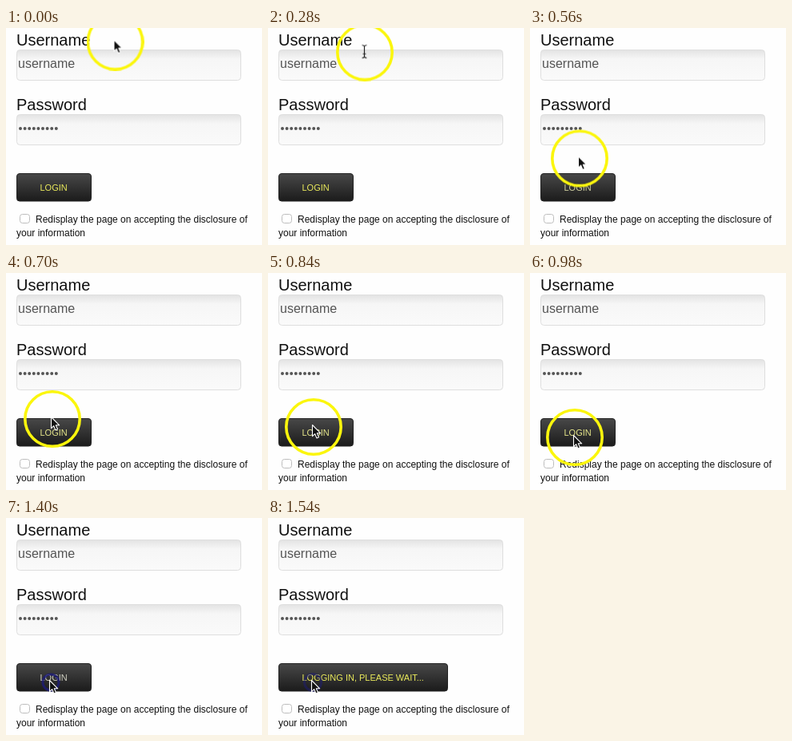
An HTML page that plays this animation: 320x272 px, repeating every 1580 ms.

```html
<!DOCTYPE html>
<html lang="en">
<head>
<meta charset="utf-8">
<title>Login form</title>
<style>
  html, body { margin: 0; width: 100%; height: 100%; overflow: hidden; background: #fefefe; }
  svg { display: block; width: 320px; height: 272px; font-family: "Liberation Sans", Arial, sans-serif; }
  .label { font-size: 20px; fill: #111; }
  .value { font-size: 16px; fill: #555; }
  .note { font-size: 12px; fill: #111; }
  .caption { font-size: 11px; fill: #ecec5c; }
  .field { fill: url(#inset); stroke: #dedede; }
  .dots { stroke: #555; stroke-width: 4; stroke-linecap: round; stroke-dasharray: 0 5.6; }
  .button { fill: url(#dark); stroke: #222; }
  .ring { fill: none; stroke: #fbf60c; stroke-width: 3.6; }
  .press { fill: none; stroke: #1d1c78; stroke-width: 3; }

  .pointer, .ring, .press, .arrow, .beam, .idle, .busy, .idle .caption {
    animation: 1580ms step-end infinite;
  }
  .pointer { animation-name: move; }
  .ring { animation-name: release; }
  .press { animation-name: press; }
  .arrow { animation-name: arrow; }
  .beam { animation-name: beam; }
  .idle { animation-name: idle; }
  .busy { animation-name: busy; }
  .idle .caption { animation-name: tint; }

  @keyframes move {
    0% { transform: translate(136.5px, 17.5px); }
    8.86% { transform: translate(136px, 19px); }
    17.72% { transform: translate(121px, 30.5px); }
    26.58% { transform: translate(77px, 116px); }
    35.44% { transform: translate(62px, 163.5px); }
    44.3% { transform: translate(58px, 183px); }
    53.16% { transform: translate(57px, 193px); }
    62.02%, 100% { transform: translate(56px, 206px); }
  }
  @keyframes release {
    0% { opacity: 1; }
    79.74%, 100% { opacity: 0; }
  }
  @keyframes press {
    0% { opacity: 0; r: 9.5px; }
    79.74% { opacity: .95; r: 9.5px; }
    88.6% { opacity: .8; r: 10px; }
    97.46%, 100% { opacity: .5; r: 10.5px; }
  }
  @keyframes arrow {
    0% { opacity: 1; }
    17.72% { opacity: 0; }
    26.58%, 100% { opacity: 1; }
  }
  @keyframes beam {
    0% { opacity: 0; }
    17.72% { opacity: 1; }
    26.58%, 100% { opacity: 0; }
  }
  @keyframes idle {
    0% { opacity: 1; }
    97.46%, 100% { opacity: 0; }
  }
  @keyframes busy {
    0% { opacity: 0; }
    97.46%, 100% { opacity: 1; }
  }
  @keyframes tint {
    0% { fill: #ecec5c; }
    35.44% { fill: #d0d0a0; }
    44.3% { fill: #e6e68a; }
    79.74%, 100% { fill: #d2d2c4; }
  }
</style>
</head>
<body>
<svg viewBox="0 0 320 272">
  <defs>
    <linearGradient id="inset" x2="0" y2="1">
      <stop offset="0" stop-color="#e3e3e3"/>
      <stop offset=".3" stop-color="#f6f6f6"/>
      <stop offset="1" stop-color="#fafafa"/>
    </linearGradient>
    <linearGradient id="dark" x2="0" y2="1">
      <stop offset="0" stop-color="#484848"/>
      <stop offset="1" stop-color="#1b1b1b"/>
    </linearGradient>
  </defs>
  <rect width="320" height="272" fill="#fefefe"/>

  <text class="label" x="13" y="22">Username</text>
  <rect class="field" x="13.5" y="27.5" width="280" height="38" rx="4"/>
  <text class="value" x="15" y="50">username</text>

  <text class="label" x="13" y="103">Password</text>
  <rect class="field" x="13.5" y="108.5" width="280" height="38" rx="4"/>
  <path class="dots" d="M18 126h45"/>

  <g class="idle">
    <rect class="button" x="13.5" y="182.5" width="93" height="34.5" rx="3.5"/>
    <text class="caption" x="42.5" y="204">LOGIN</text>
  </g>
  <g class="busy">
    <rect class="button" x="13.5" y="182.5" width="211" height="34.5" rx="3.5"/>
    <text class="caption" x="42.5" y="204">LOGGING IN, PLEASE WAIT...</text>
  </g>

  <rect x="17.5" y="233.5" width="12" height="11" rx="3" fill="#fff" stroke="#bdbdbd"/>
  <text class="note" x="37" y="244">Redisplay the page on accepting the disclosure of</text>
  <text class="note" x="13" y="261">your information</text>

  <g class="pointer">
    <circle class="ring" r="34.2"/>
    <circle class="press" r="9.5"/>
    <path class="arrow" d="M-1.5-2.5v14.2l3.2-3 2.2 5.2 2.6-1.1-2.2-5h4.4z"
          fill="#111" stroke="#fff" stroke-width="1.1" stroke-linejoin="round"/>
    <g class="beam" fill="none">
      <path id="bar" d="M-3.5-9q2.5 0 3 1.5q.5-1.5 3-1.5M-.5-7.5v13M-3.5 7q2.5 0 3-1.5q.5 1.5 3 1.5M-2.5 2h4"
            stroke="#222" stroke-width="1.2"/>
    </g>
  </g>
</svg>
</body>
</html>
```
